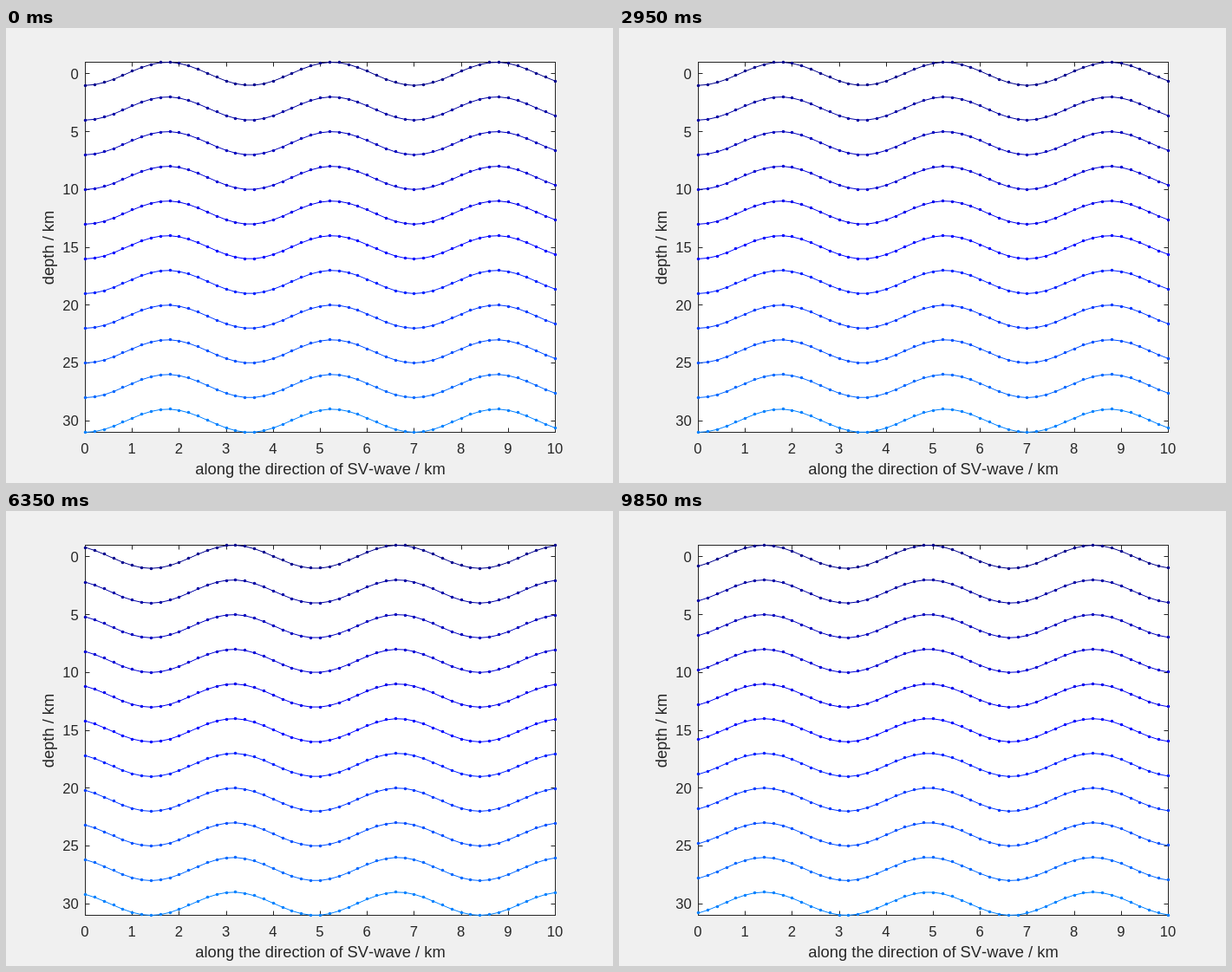
Write an HTML page with a canvas that moves like this. It is 700 px wide and 525 px high and loops after 9.95 s.

```html
<!DOCTYPE html>
<html lang="en">
<head>
<meta charset="utf-8">
<title>SV-wave</title>
<style>
  html, body { margin: 0; width: 100%; height: 100%; overflow: hidden; background: #f0f0f0; }
  canvas { display: block; }
</style>
</head>
<body>
<canvas id="stage" width="700" height="525"></canvas>
<script>
const ctx = document.getElementById('stage').getContext('2d');

const LOOP = 9950, FIRST = 50, STEP = 100;
const LEFT = 91.5, RIGHT = 633.5, TOP = 39.5, BOTTOM = 466.5;
const INK = '#262626', TICK = 5;
const WAVELENGTH = 3.5, STEPS_PER_PERIOD = 10;
const ROWS = 11, POINTS = 51;

const px = km => LEFT + km / 10 * (RIGHT - LEFT);
const py = depth => TOP + (depth + 1) / 32 * (BOTTOM - TOP);
const snap = v => Math.floor(v) + 0.5;

// Dark blue through pure blue towards light blue
function rowColor(row) {
  const v = 0.55 + row * 0.095;
  const green = Math.round(255 * Math.max(0, v - 1));
  const blue = Math.round(255 * Math.min(1, v));
  return `rgb(0,${green},${blue})`;
}

function segment(x1, y1, x2, y2) {
  ctx.moveTo(x1, y1);
  ctx.lineTo(x2, y2);
}

function label(text, x, y, size, align) {
  ctx.font = `${size}px "Liberation Sans", Arial, sans-serif`;
  ctx.textAlign = align;
  ctx.fillText(text, x, y);
}

function drawAxes() {
  ctx.fillStyle = '#f0f0f0';
  ctx.fillRect(0, 0, 700, 525);
  ctx.fillStyle = '#fff';
  ctx.fillRect(LEFT, TOP, RIGHT - LEFT, BOTTOM - TOP);

  ctx.strokeStyle = ctx.fillStyle = INK;
  ctx.lineWidth = 1;
  ctx.fontKerning = 'none';
  ctx.textBaseline = 'alphabetic';
  ctx.strokeRect(LEFT, TOP, RIGHT - LEFT, BOTTOM - TOP);

  ctx.beginPath();
  for (let km = 0; km <= 10; km++) {
    const x = snap(px(km));
    segment(x, TOP, x, TOP + TICK);
    segment(x, BOTTOM, x, BOTTOM - TICK);
    label(km, px(km) - 0.5, 491, 16.67, 'center');
  }
  for (let depth = 0; depth <= 30; depth += 5) {
    const y = snap(py(depth));
    segment(LEFT, y, LEFT + TICK, y);
    segment(RIGHT, y, RIGHT - TICK, y);
    label(depth, 83.7, Math.round(py(depth) + 6), 16.67, 'right');
  }
  ctx.stroke();

  label('along the direction of SV-wave / km', 362.5, 515, 18.33, 'center');
  ctx.save();
  ctx.translate(55, 253.5);
  ctx.rotate(-Math.PI / 2);
  label('depth / km', 0, 0, 18.33, 'center');
  ctx.restore();
}

function drawWave(row, step) {
  const shift = step / STEPS_PER_PERIOD * WAVELENGTH;
  const points = Array.from({ length: POINTS }, (_, i) => {
    const km = i * 10 / (POINTS - 1);
    const phase = 2 * Math.PI * (km - shift) / WAVELENGTH;
    return [px(km), py(row * 3 + Math.cos(phase))];
  });

  ctx.strokeStyle = ctx.fillStyle = rowColor(row);
  ctx.beginPath();
  points.forEach(([x, y]) => ctx.lineTo(x, y));
  ctx.stroke();

  ctx.beginPath();
  for (const [x, y] of points) {
    ctx.moveTo(snap(x) + 1.8, snap(y));
    ctx.arc(snap(x), snap(y), 1.8, 0, 2 * Math.PI);
  }
  ctx.fill();
}

function draw(time) {
  const t = time % LOOP;
  const step = t < FIRST ? 0 : Math.floor((t - FIRST) / STEP) + 1;
  drawAxes();
  for (let row = 0; row < ROWS; row++) drawWave(row, step);
}

const start = performance.now();
function tick() {
  draw(performance.now() - start);
  requestAnimationFrame(tick);
}
tick();
</script>
</body>
</html>
```
